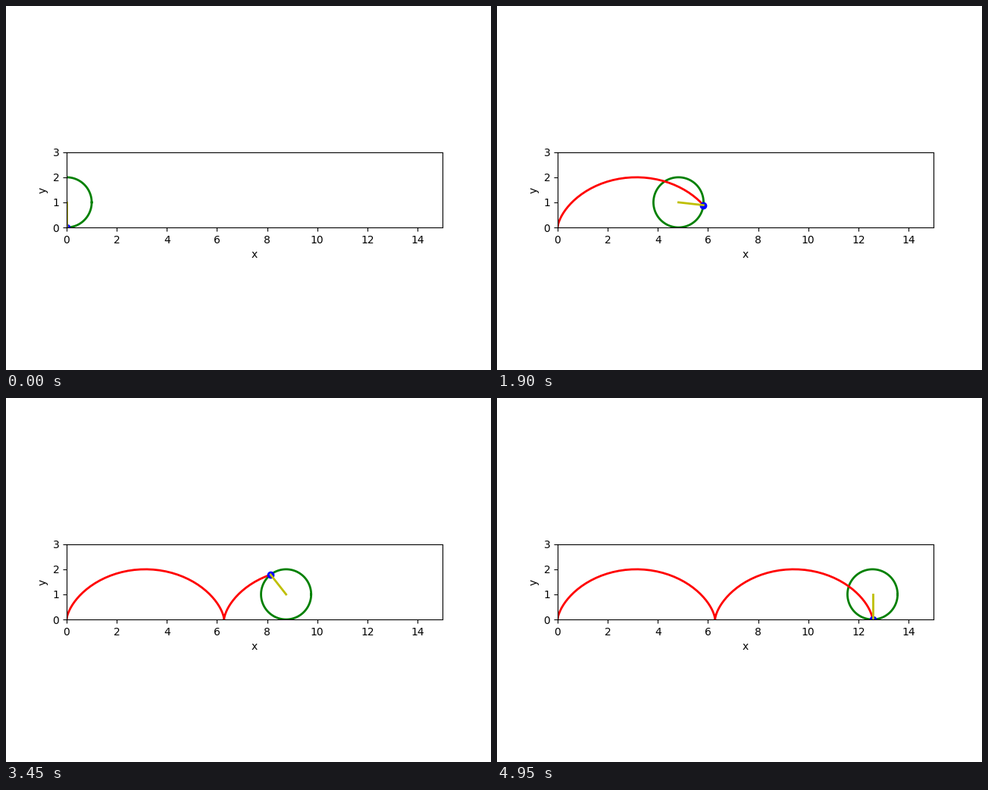
Write a matplotlib script that moves like this. It is 640 by 480 pixels and loops after 5 s.

```python
import numpy as np
import matplotlib.pyplot as plt
from matplotlib.animation import FuncAnimation

FRAMES = 100
INTERVAL = 50
R = 1.0

# Rolling angle per frame: two full turns, both ends included
theta = np.linspace(0, 4 * np.pi, FRAMES)
trace_x = R * (theta - np.sin(theta))
trace_y = R * (1 - np.cos(theta))

phi = np.linspace(0, 2 * np.pi, 100)
rim_x, rim_y = R * np.cos(phi), R + R * np.sin(phi)

fig, ax = plt.subplots(figsize=(6.4, 4.8), dpi=100)
ax.set_aspect("equal")
ax.set_xlim(0, 15)
ax.set_ylim(0, 3)
ax.set_xticks(range(0, 15, 2))
ax.set_yticks(range(4))
ax.set_xlabel("x")
ax.set_ylabel("y")

wheel, = ax.plot([], [], "g", lw=2)
trace, = ax.plot([], [], "r", lw=2)
dot, = ax.plot([], [], "bo")
spoke, = ax.plot([], [], "y", lw=2)


def update(i):
    center = R * theta[i]
    x, y = trace_x[i], trace_y[i]
    wheel.set_data(center + rim_x, rim_y)
    trace.set_data(trace_x[:i + 1], trace_y[:i + 1])
    dot.set_data([x], [y])
    spoke.set_data([center, x], [R, y])
    return wheel, trace, dot, spoke


anim = FuncAnimation(fig, update, frames=FRAMES, interval=INTERVAL,
                     init_func=lambda: update(0), repeat=True)
plt.show()
```
